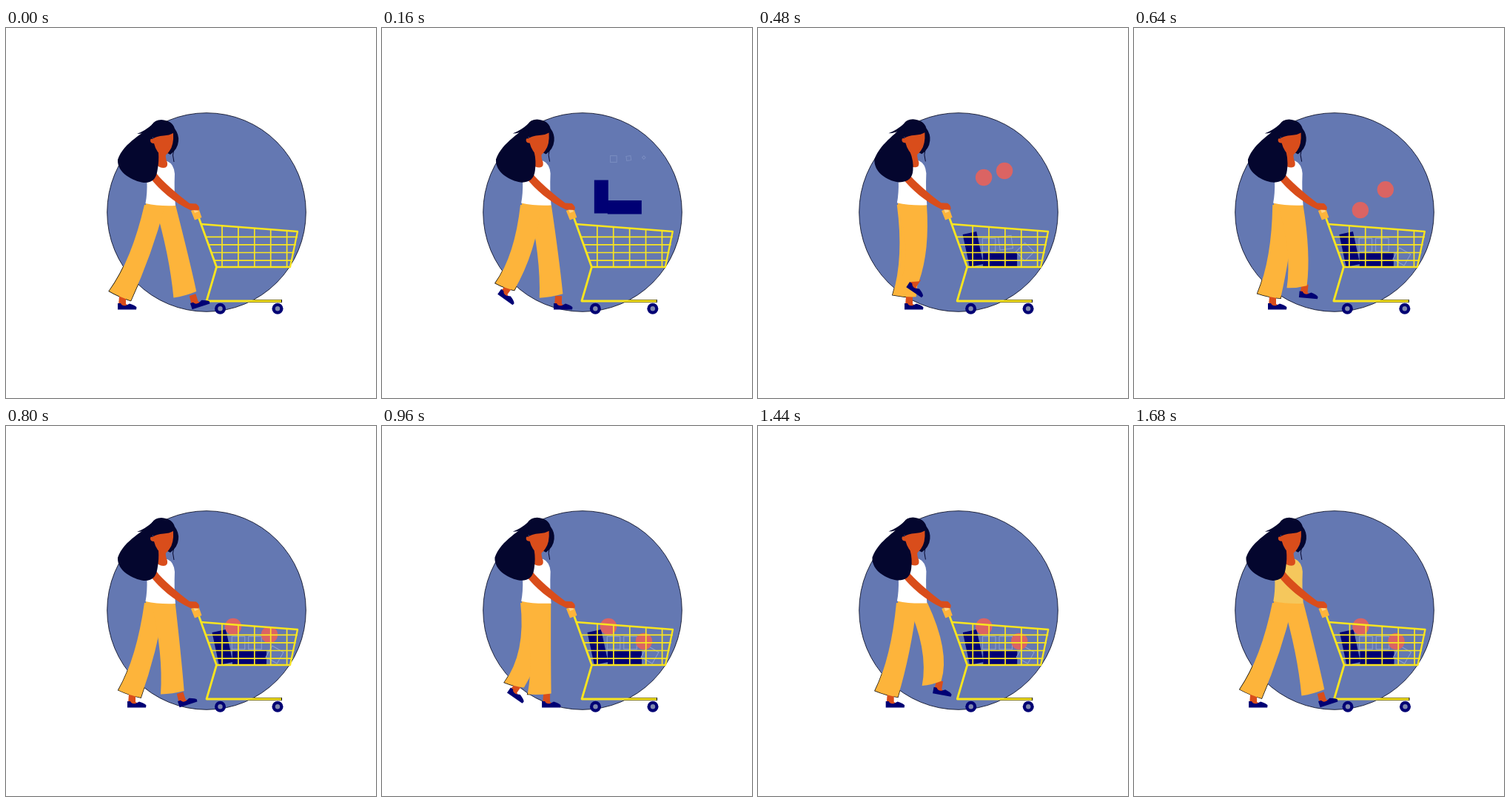
Animation, 500 px wide and 500 px high, one loop 1760 ms. Source, as an HTML page:

```html
<!DOCTYPE html>
<html lang="en">
<head>
<meta charset="utf-8">
<title>Shopping walk</title>
<style>
html, body { margin: 0; width: 100%; height: 100%; overflow: hidden; background: #fff; }
svg { display: block; width: 100vw; height: 100vh; }
.navy { fill: #000074; }
.skin { fill: #d94d1b; }
.hair { fill: #04062e; }
.pants { fill: #fdb43b; }
.wire { fill: none; stroke: #f9e51f; stroke-linejoin: round; }
.box { fill: none; stroke: #8fa2cf; }
.ball { fill: #db6463; }
</style>
</head>
<body>
<svg viewBox="0 0 500 500" xmlns="http://www.w3.org/2000/svg">
  <defs>
    <clipPath id="outside">
      <path clip-rule="evenodd" d="M0 0H500V500H0Z M136.5 249a134.5 134.5 0 1 0 269 0a134.5 134.5 0 1 0 -269 0Z"/>
    </clipPath>
    <g id="foot">
      <path class="skin" d="M-4 -11H5L5 0L11 3L2 5L-5 3Z"/>
      <path class="navy" d="M-6 -1L-2 -1Q0 3 5 2L10 -.5Q18 2 19.500 4.500L19 7.500H-6Z"/>
    </g>
    <g id="wheel">
      <circle class="navy" r="7.5"/>
      <circle r="3.200" fill="#7f88ae"/>
    </g>
  </defs>

  <circle cx="271" cy="249" r="134.300" fill="#6478b2" stroke="#10152c" stroke-width=".9"/>

  <g id="goods">
    <rect id="tall" class="navy" x="-9.500" y="-22.500" width="19" height="45"/>
    <rect id="wide" class="navy" x="-23" y="-9" width="46" height="18.500"/>
  </g>

  <g id="cart">
    <g clip-path="url(#outside)">
      <path d="M271 369H373" stroke="#111" stroke-width="4.200"/>
    </g>
    <path class="wire" stroke-width="2.800" d="M260 255L284.500 323L271 369H372"/>
    <path class="wire" stroke-width="2.300" d="M263 265L394 275L384 323H284"/>
    <path id="mesh" class="wire" stroke-width="1.700"/>
    <use href="#wheel" x="289.500" y="379.300"/>
    <use href="#wheel" x="367" y="379.300"/>
    <path class="pants" d="M250 247L260 243L264.500 256L255 259.500Z"/>
    <path fill="#ffd488" d="M253 245L258 243L260 248L255 250Z"/>
  </g>

  <g clip-path="url(#outside)" stroke="#111" stroke-width="1.500">
    <use href="#farPants"/><use href="#nearPants"/>
  </g>
  <use id="farFoot" href="#foot"/>
  <path id="farPants" class="pants"/>
  <use id="nearFoot" href="#foot"/>
  <path id="nearPants" class="pants"/>
  <path class="pants" d="M189 235L228 237L228 242L189 242Z"/>

  <g id="body">
    <path id="shirt" d="M191 206L203 184L218 180Q227 184 228 197Q227 220 229 240Q207 241 188.500 237Q191 224 190.500 207Z"/>
    <path class="skin" d="M206 166L216 166Q215 176 218 182Q219 189 213 189Q207 189 204 185Z"/>
    <path class="skin" d="M203 196C212 208 230 223 248 237L257 237.500Q263 242 260.500 246.500L249 246C226 235 208 219 195 203Z"/>
    <path id="mane" class="hair"/>
    <path class="hair" d="M197 131Q201 124 210 124Q225 125 228 136Q234 144 233 153Q232 164 222 171L200 160Z"/>
    <path class="skin" d="M198 150Q203 146 213 145.500Q221 145 226 142Q227 158 221 166Q217 172 212 174Q203 168 200 156Q195 156 195 152Q195 149 198 150Z"/>
    <path fill="none" stroke="#04062e" d="M227 163Q224 172 227 181"/>
    <path class="hair" d="M198 137Q186 143 177 143Q188 139 198 130Z"/>
  </g>
</svg>
<script>
const LOOP = 1760, STEP = 80, HALF = 800;
const HIP_Y = 239, GROUND = 373;
const $ = id => document.getElementById(id);
const lerp = (a, b, u) => a + (b - a) * u;
const clamp = (v, lo, hi) => Math.min(hi, Math.max(lo, v));
const part = (t, a, b) => clamp((t - a) / (b - a), 0, 1);
const smooth = u => u * u * (3 - 2 * u);

// plant: landing time, hold: time on the ground, front/back: reach of the ankle
const far = { name: "far", plant: 0, hold: HALF, front: 255, back: 170, slow: 1, rush: 1.15, kick: 11 };
const near = { name: "near", plant: HALF, hold: LOOP - HALF, front: 238, back: 157, slow: 1.2, rush: 1, kick: 4 };

// Ankle place: slides back on the ground, then swings forward in an arc
function stride(leg, t) {
  const time = (t - leg.plant + LOOP) % LOOP;
  let reach, angle, lift = 0;
  if (time < leg.hold) {
    const u = time / leg.hold;
    reach = (1 - u) ** leg.slow;
    angle = -18 * (1 - part(u, 0, 0.15));
  } else {
    const u = Math.min(1, leg.rush * (time - leg.hold) / (LOOP - leg.hold));
    reach = smooth(u);
    lift = Math.sin(Math.PI * u);
    angle = 75 * lift * Math.sqrt(1 - u) - 18 * u;
  }
  const x = lerp(leg.back, leg.front, reach);
  const y = GROUND - 27 * lift + 0.1 * Math.min(0, angle);
  return { x, y, angle, reach, lift };
}

function pantsPath(leg, { x, y, angle, reach, lift }) {
  const hx = x - 3 - 8 * reach + 0.12 * angle;
  const hy = y - 11 + 6 * lift;
  const spread = clamp((hx - 205) / 30, -1, 1);
  const hip = 208 + 7 * spread;
  const hipHalf = 20 - 6 * Math.abs(spread);
  const knee = (hip + hx) / 2 + 3 + leg.kick * lift;
  const kneeY = (HIP_Y + hy) / 2 + 5;

  const len = Math.hypot(hx - 208, hy - HIP_Y), w = 16 - 4 * lift;
  const ox = w * (hy - HIP_Y) / len, oy = -w * (hx - 208) / len;
  const edge = side => {
    const top = hip + side * hipHalf, ex = hx + side * ox, ey = hy + side * oy;
    const cx = 2 * (knee + side * 14) - (top + ex) / 2;
    const cy = 2 * kneeY - (HIP_Y + ey) / 2;
    return { top: `${top} ${HIP_Y}`, bend: `${cx} ${cy}`, end: `${ex} ${ey}` };
  };
  const l = edge(-1), r = edge(1);
  return `M${l.top}Q${l.bend} ${l.end}Q${hx} ${hy + 2} ${r.end}Q${r.bend} ${r.top}Z`;
}

function place(el, x, y, angle = 0, size = 1) {
  el.setAttribute("transform", `translate(${x} ${y}) rotate(${angle}) scale(${size})`);
}

function drawLeg(leg, t) {
  const s = stride(leg, t);
  place($(leg.name + "Foot"), s.x, s.y, s.angle);
  $(leg.name + "Pants").setAttribute("d", pantsPath(leg, s));
}

function manePath(s) {
  return `M199 129C${188 + s / 2} 142 ${159 + s * 1.2} 154 ${151 + s} 178` +
    `C${150 + s} 196 ${172 + s / 2} 207 ${186 + s / 2} 209` +
    `Q${202 + s} 210 ${204.5 + s * 0.8} 193Q${207 + s * 0.6} 180 206 168L198 148L215 134Z`;
}

function add(tag, attrs) {
  const el = document.createElementNS("http://www.w3.org/2000/svg", tag);
  for (const k in attrs) el.setAttribute(k, attrs[k]);
  return $("goods").appendChild(el);
}

const boxes = [0, 1, 2].map(() => add("rect", { class: "box" }));
const balls = [0, 1].map(() => add("circle", { class: "ball", r: 11.2 }));

let mesh = "";
for (let i = 0; i < 4; i++) mesh += `M${269.5 + i * 3.8} ${282.3 + i * 10.6}H${394 - i * 2.2}`;
for (let i = 0; i < 5; i++) mesh += `M${292 + i * 21.9} ${267 + i * 1.7}V323`;
$("mesh").setAttribute("d", mesh);

function drawGoods(t) {
  const grow = part(t, 20, 120), tilt = part(t, 240, 400);
  const dy = -24 * (1 - part(t, 80, 160)) - 71 * (1 - part(t, 160, 320) ** 2);
  place($("tall"), lerp(297.5, 292.5, tilt), 299 + dy, -12 * tilt, grow);
  place($("wide"), 329, 313 + dy, 0, grow);

  const turn = part(t, 480, 640);
  const angles = [0, -8 * (1 - turn), lerp(45, 30, turn)];
  boxes.forEach((box, i) => {
    const u = part(t, 240, 480 + i * 3) ** 2;
    const size = 17.5 * part(t, 80 + 25 * i, 240 + 25 * i);
    for (const k of ["width", "height"]) box.setAttribute(k, size);
    for (const k of ["x", "y"]) box.setAttribute(k, -size / 2);
    box.setAttribute("opacity", lerp(0.5, 1, part(t, 160, 320)));
    place(box, 314 + 20.5 * i + u * i * i * 2, lerp(177 - i, i < 2 ? 293 : 309, u), angles[i]);
  });

  const pop = part(t, 320, 460);
  const drop = part(t, 480, 680) ** 2;
  const roll = part(t, 480, 780) ** 2, rest = part(t, 800, 900);
  place(balls[0], 307, lerp(202, 271, drop), 0, pop);
  place(balls[1], lerp(335, 356, roll) - rest, lerp(193, 282, roll) + 9 * rest, 0, pop);
}

function draw(t) {
  drawLeg(far, t);
  drawLeg(near, t);

  const first = t < HALF;
  const sway = Math.sin(Math.PI * (first ? t / HALF : (t - HALF) / (LOOP - HALF)));
  const dx = -2 * sway;
  place($("cart"), dx, 0);
  place($("goods"), dx, 0);
  place($("body"), dx / 3, dx / 3);
  $("mane").setAttribute("d", manePath((first ? 7.5 : 5) * sway ** 1.5));
  $("shirt").setAttribute("fill", t >= 1680 ? "#f5c75c" : "#fff");
  drawGoods(t);
}

const start = performance.now();
function tick() {
  const t = (performance.now() - start) % LOOP;
  draw(Math.floor(t / STEP) * STEP);
  requestAnimationFrame(tick);
}
tick();
</script>
</body>
</html>
```
